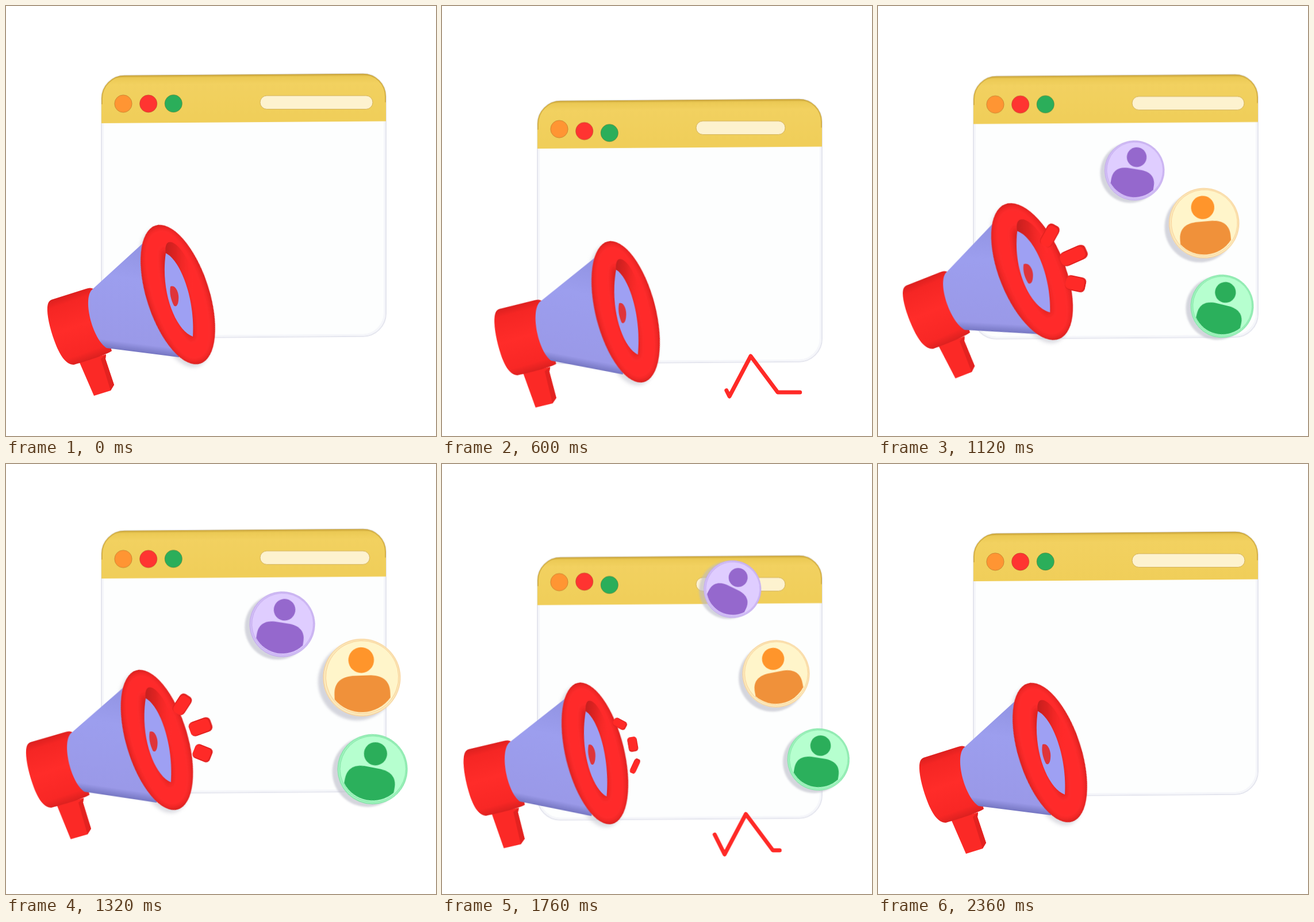
An HTML page without scripts that plays this animation: 748x748 px, repeating every 2400 ms.

```html
<!DOCTYPE html>
<html lang="en">
<head>
<meta charset="utf-8">
<title>Announcement</title>
<style>
html, body { margin: 0; width: 100%; height: 100%; overflow: hidden; background: #fff; }
svg { display: block; width: 100vw; height: 100vh; }
.window, .address, .dot, .horn, .ring, .pulse, .trace, .badge, .spark, .tip {
  animation: 2400ms linear infinite;
}

/* browser window */
.window { animation-name: bob; }
@keyframes bob {
  0% { transform: translateY(0); animation-timing-function: ease-out; }
  4.17% { transform: translateY(-6px); animation-timing-function: cubic-bezier(.37, 0, .63, 1); }
  28.75% { transform: translateY(47px); animation-timing-function: cubic-bezier(.37, 0, .63, 1); }
  52.5% { transform: translateY(-6px); animation-timing-function: cubic-bezier(.37, 0, .63, 1); }
  78.33% { transform: translateY(46px); animation-timing-function: cubic-bezier(.37, 0, .7, .85); }
  98.33%, 100% { transform: translateY(0); }
}
.address { animation-name: squeeze; animation-timing-function: cubic-bezier(.37, 0, .63, 1); }
@keyframes squeeze {
  0%, 49.17%, 98.33%, 100% { width: 196px; }
  24.58%, 73.75% { width: 155px; }
}
.dot { animation-name: ripple; }
@keyframes ripple {
  0%, 20%, 37.5%, 68.33%, 87.5%, 100% { transform: translateY(0); }
  25%, 33.33%, 77.5%, 85% { transform: translateY(var(--down)); }
  73.33% { transform: translateY(var(--up)); }
}

/* megaphone */
.horn { animation-name: recoil; animation-timing-function: ease-in-out; }
@keyframes recoil {
  0%, 98.33%, 100% { transform: translate(299px, 502px) rotate(0deg); }
  25% { transform: translate(319.5px, 532px) rotate(3.6deg); }
  38.33% { transform: translate(260px, 453.5px) rotate(-8.7deg); }
  46.67% { transform: translate(268px, 462px) rotate(-4deg); }
  55% { transform: translate(262.5px, 480px) rotate(1.3deg); }
  63.33% { transform: translate(248px, 518px) rotate(2.5deg); }
  73.33% { transform: translate(266px, 503.5px) rotate(4.2deg); }
  79.17% { transform: translate(238px, 482px) rotate(-2deg); }
  85% { transform: translate(259px, 473.5px) rotate(-8.9deg); }
  92.5% { transform: translate(302px, 517px) rotate(-2deg); }
}
.ring { animation-name: widen; animation-timing-function: ease-in-out; }
@keyframes widen {
  0%, 98.33%, 100% { transform: scaleX(1); }
  25% { transform: scaleX(.96); }
  38.33% { transform: scaleX(1.12); }
  55% { transform: scaleX(.985); }
  73.33% { transform: scaleX(.94); }
  85% { transform: scaleX(1.1); }
}

/* heartbeat line */
.trace {
  fill: none; stroke: #ff2a27; stroke-width: 7; stroke-linecap: round; stroke-linejoin: round;
  stroke-dasharray: 208 1000; animation-name: trace;
}
@keyframes trace {
  0%, 6.3% { stroke-dashoffset: 220px; }
  25% { stroke-dashoffset: -157px; }
  37% { stroke-dashoffset: -400px; }
  37.01%, 56% { stroke-dashoffset: 220px; }
  73.33% { stroke-dashoffset: -130px; }
  85% { stroke-dashoffset: -365px; }
  87%, 100% { stroke-dashoffset: -400px; }
}
.pulse { animation-name: drift; }
@keyframes drift {
  0%, 37%, 85%, 100% { transform: translateX(0); }
  50%, 73.33% { transform: translateX(-8.5px); }
}

/* people badges */
.violet { animation-name: violet; --face: #dfcdff; --rim: #d2c0f7; --head: #9568cd; --torso: #9568cd; }
.amber { animation-name: amber; --face: #fff5ca; --rim: #fbeabd; --head: #ff952b; --torso: #f0913a; }
.green { animation-name: green; --face: #b6ffcf; --rim: #a0f5bf; --head: #2bae5a; --torso: #2bb05c; }
@keyframes violet {
  0%, 32.5% { transform: translate(262px, 440px) rotate(40deg) scale(0); }
  38.33% { transform: translate(319.5px, 347.5px) rotate(18deg) scale(.32); }
  50% { transform: translate(496px, 262px) rotate(6deg) scale(.6); }
  55% { transform: translate(480.5px, 279px) rotate(9deg) scale(.57); }
  73.33% { transform: translate(505.5px, 217.5px) rotate(26deg) scale(.5); }
  85% { transform: translate(447px, 270px) rotate(22deg) scale(.605); animation-timing-function: ease-in; }
  92%, 100% { transform: translate(275px, 485px) rotate(20deg) scale(0); }
}
@keyframes amber {
  0%, 32.5% { transform: translate(265px, 450px) rotate(-40deg) scale(0); }
  38.33% { transform: translate(356.5px, 408px) rotate(-23deg) scale(.365); }
  50% { transform: translate(650px, 366px) rotate(2deg) scale(.71); }
  55% { transform: translate(619px, 371.5px) rotate(-2deg) scale(.675); }
  73.33% { transform: translate(581px, 365px) rotate(-11deg) scale(.585); }
  85% { transform: translate(580px, 343px) rotate(0deg) scale(.7); animation-timing-function: ease-in; }
  92%, 100% { transform: translate(275px, 485px) rotate(0deg) scale(0); }
}
@keyframes green {
  0%, 32.5% { transform: translate(265px, 455px) rotate(40deg) scale(0); }
  38.33% { transform: translate(381px, 482px) rotate(23deg) scale(.34); }
  50% { transform: translate(684px, 538px) rotate(10deg) scale(.63); }
  55% { transform: translate(637.5px, 531px) rotate(11deg) scale(.61); }
  70% { transform: translate(663px, 517px) rotate(10deg) scale(.54); }
  73.33% { transform: translate(655px, 514px) rotate(9deg) scale(.54); }
  85% { transform: translate(596px, 502px) rotate(0deg) scale(.65); animation-timing-function: ease-in; }
  92%, 100% { transform: translate(275px, 485px) rotate(0deg) scale(0); }
}
.face { fill: var(--face); }
.rim { fill: var(--rim); }
.head { fill: var(--head); }
.torso { fill: var(--torso); }
.groove { fill: none; stroke: var(--torso); stroke-width: 1.2; opacity: .5; }

/* sparks */
.high { animation-name: high; }
.mid { animation-name: mid; }
.low { animation-name: low; }
@keyframes high {
  0%, 32.5% { transform: translate(265px, 430px) rotate(-65deg) scale(0, 0); }
  38.33% { transform: translate(291px, 380px) rotate(-65deg) scale(1.25, .9); }
  55% { transform: translate(306.5px, 418px) rotate(-57deg) scale(1.02, .9); }
  73.33% { transform: translate(309.5px, 452px) rotate(28deg) scale(.68, .6); }
  78%, 100% { transform: translate(300px, 460px) rotate(50deg) scale(0, 0); }
}
@keyframes mid {
  0%, 32.5% { transform: translate(270px, 450px) rotate(-28deg) scale(0, 0); }
  38.33% { transform: translate(342px, 411px) rotate(-28deg) scale(1.6, 1); }
  55% { transform: translate(338.5px, 457px) rotate(-20deg) scale(1.1, 1); }
  73.33% { transform: translate(332px, 487.5px) rotate(80deg) scale(.72, .65); }
  78%, 100% { transform: translate(315px, 490px) rotate(100deg) scale(0, 0); }
}
@keyframes low {
  0%, 32.5% { transform: translate(270px, 460px) rotate(0deg) scale(0, 0); }
  38.33% { transform: translate(346px, 463px) rotate(2deg) scale(1.05, 1); }
  55% { transform: translate(342px, 503px) rotate(22deg) scale(.9, 1); }
  73.33% { transform: translate(336px, 525.5px) rotate(-65deg) scale(.76, .42); }
  78%, 100% { transform: translate(318px, 520px) rotate(-85deg) scale(0, 0); }
}
.tip { fill: #ff2a27; animation-name: pierce; }
@keyframes pierce {
  0%, 35% { opacity: 0; }
  36%, 41% { opacity: 1; }
  42%, 100% { opacity: 0; }
}
</style>
</head>
<body>
<svg viewBox="0 0 748 748" xmlns="http://www.w3.org/2000/svg">
  <defs>
    <linearGradient id="header" x2="0" y2="1">
      <stop offset="0" stop-color="#cfa93c"/>
      <stop offset=".06" stop-color="#ecca55"/>
      <stop offset=".2" stop-color="#f2d160"/>
      <stop offset="1" stop-color="#f0ce59"/>
    </linearGradient>
    <linearGradient id="cone" gradientUnits="userSpaceOnUse" x1="28" y1="-97" x2="2" y2="109">
      <stop offset="0" stop-color="#8e90df"/>
      <stop offset=".4" stop-color="#9c9eee"/>
      <stop offset=".93" stop-color="#9a99e8"/>
      <stop offset="1" stop-color="#7576c2"/>
    </linearGradient>
    <linearGradient id="barrel" x1=".3" y1="0" x2=".6" y2="1">
      <stop offset="0" stop-color="#c81b1b"/>
      <stop offset=".18" stop-color="#f52624"/>
      <stop offset=".5" stop-color="#ff2c29"/>
      <stop offset=".85" stop-color="#f82725"/>
      <stop offset="1" stop-color="#d01e1d"/>
    </linearGradient>
    <linearGradient id="bore">
      <stop offset="0" stop-color="#c41f1e"/>
      <stop offset=".3" stop-color="#d8211f" stop-opacity=".8"/>
      <stop offset=".75" stop-color="#fb2b28" stop-opacity="0"/>
    </linearGradient>
    <filter id="soft" x="-20%" y="-20%" width="140%" height="140%"><feGaussianBlur stdDeviation="3"/></filter>
    <filter id="sheen" x="-40%" y="-20%" width="180%" height="140%"><feGaussianBlur stdDeviation="5"/></filter>
    <clipPath id="frame"><rect width="495" height="457" rx="40"/></clipPath>
    <clipPath id="rim"><ellipse rx="54.6" ry="126.5"/></clipPath>

    <g id="person">
      <circle cx="-13" cy="10" r="100" fill="#b9bac6" opacity=".6" filter="url(#soft)"/>
      <circle class="rim" r="100"/>
      <circle class="groove" r="99"/>
      <circle class="face" cx="1" cy="-1" r="94"/>
      <circle class="groove" cx="1" cy="-1" r="94"/>
      <circle class="head" cy="-45" r="33"/>
      <path class="torso" d="M-72 42C-72 8 -50 -5 -18 -5H18C50 -5 72 8 72 42V54A91 91 0 0 1 -72 54Z"/>
    </g>
    <g id="capsule">
      <rect x="-18" y="-13" width="36" height="26" rx="8" fill="#e32220"/>
      <rect x="-18" y="-11" width="33" height="22" rx="7" fill="#ff2a27"/>
    </g>
  </defs>

  <path d="M165.5 280V366M165.5 430V500" stroke="#a3a3d6"/>

  <g class="window">
    <g transform="translate(166 121) skewY(-.4)">
      <rect width="495" height="457" rx="40" fill="#fdfefe" stroke="#e4e5ee" stroke-width="2"/>
      <rect x="2.5" y="2.5" width="490" height="452" rx="38" fill="#fdfefe" stroke="#f5f6fa" stroke-width="3"/>
      <rect width="495" height="83" fill="url(#header)" clip-path="url(#frame)"/>
      <path d="M1 50V40A39 39 0 0 1 40 1H455A39 39 0 0 1 494 40V50" fill="none" stroke="#c9a43c" stroke-width="2" opacity=".7"/>
    </g>
    <rect class="address" x="442" y="156" width="196" height="23.5" rx="11.7" fill="#fdf2cf" stroke="#d3b25a"/>
    <g stroke-opacity=".35" stroke="#7a5a20">
      <circle class="dot" style="--up:-6px;--down:0px" cx="204" cy="170" r="15.2" fill="#ff9533"/>
      <circle class="dot" style="--up:-7px;--down:3.5px" cx="247.7" cy="170" r="15.2" fill="#ff3431"/>
      <circle class="dot" style="--up:-1px;--down:7px" cx="291.3" cy="169.7" r="15.2" fill="#2bae5a"/>
    </g>
  </g>

  <g class="pulse"><path class="trace" d="M420 672H445L465 609 500 679 537 609 584 672H648"/></g>

  <g class="horn">
    <ellipse cx="-6" cy="4" rx="54" ry="126" transform="rotate(-18)" fill="#b9bac6" opacity=".5" filter="url(#soft)"/>
    <path d="M-172 116L-146 176 -117 167 -111 157 -126 112 -125 104Z" fill="#fb2926"/>
    <path d="M-134 112L-117 167 -111 157 -126 112 -125 104Z" fill="#e32220"/>
    <path d="M-227 22C-226 13 -224 10 -217 8L-160 -10Q-152 -13 -147 -10L-115 98C-124 104 -150 113 -181 122C-195 122 -206 105 -215 80C-223 58 -228 35 -227 22Z" fill="url(#barrel)"/>
    <path d="M-58 -92L-150 -8C-166 10 -148 78 -124 93L2 109 20 0Z" fill="url(#cone)"/>
    <g transform="rotate(-18)"><g class="ring">
      <g clip-path="url(#rim)">
        <ellipse rx="54.6" ry="126.5" fill="#cf1f1d"/>
        <ellipse rx="33" ry="105" fill="none" stroke="#ff2c29" stroke-width="36" filter="url(#sheen)"/>
      </g>
      <g class="ring"><g transform="rotate(18)">
        <path d="M-21 -70C-26 -104 -1 -96 18 -58C42 -10 53 84 28 77C-4 62 -28 -10 -21 -70Z" fill="url(#bore)"/>
        <path d="M-21 -72C4 -60 30 6 26 73C-4 62 -31 -5 -21 -72Z" fill="#9ea0f3"/>
        <path d="M-13 -14C-4 -18 3 -2 1 10C0 20 -4 22 -7 19C-12 9 -15 -2 -13 -14Z" fill="#df343a"/>
      </g></g>
    </g></g>
  </g>

  <g class="spark high"><use href="#capsule"/></g>
  <g class="spark mid"><use href="#capsule"/></g>
  <g class="spark low"><use href="#capsule"/></g>

  <g class="badge violet"><use href="#person"/></g>
  <g class="badge amber"><use href="#person"/></g>
  <g class="badge green"><use href="#person"/></g>

  <path class="tip" d="M334 413L341 403 366 388C377 385 383 393 380 402L350 418 343 415 337 419Z"/>
  <path class="tip" d="M361 463C372 459 385 464 387 474L380 481C373 479 366 474 361 463Z"/>
</svg>
</body>
</html>
```
